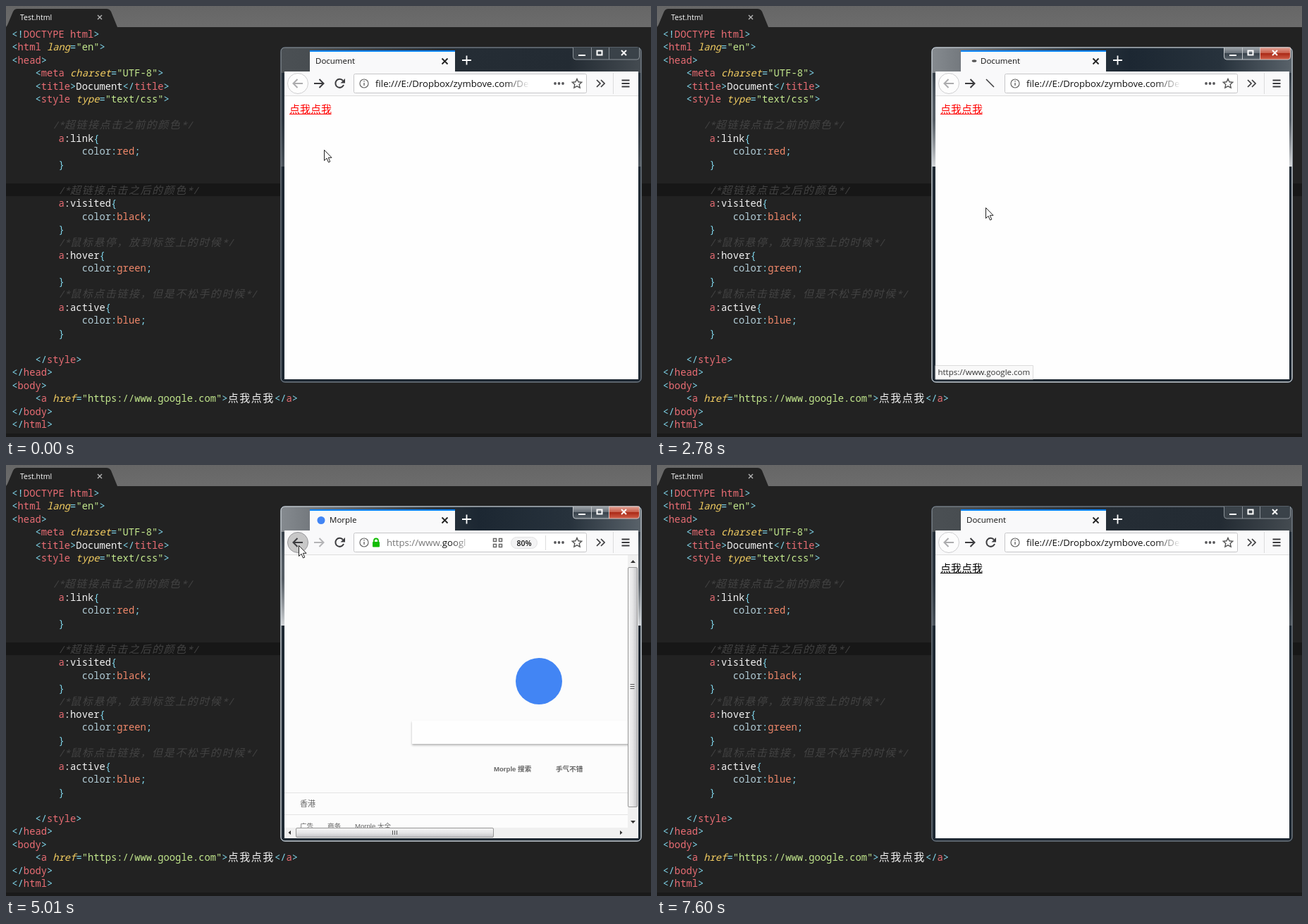
Animation of 915 by 612 pixels, one loop 7700 ms. Source, as an HTML page:

```html
<!DOCTYPE html>
<html lang="zh">
<head>
<meta charset="utf-8">
<title>Link states</title>
<style>
html, body { margin: 0; width: 100%; height: 100%; overflow: hidden; background: #222; }
svg { display: block; width: 915px; height: 612px; }
text { white-space: pre; font-family: "Open Sans", "Noto Sans CJK SC", "Noto Sans CJK", sans-serif; }
#code text { font: 13.8px "Noto Sans Mono", "Noto Sans CJK SC", "Noto Sans CJK", monospace; }
#code .z, #code .k { font-size: 15px; letter-spacing: 1.56px; }
.p { fill: #7fd5ea; } .r { fill: #ea6d74; } .w, .z { fill: #f2f2f2; }
.y { fill: #f6d062; font-style: italic; } .g { fill: #c3e88d; }
.b { fill: #b2ccd6; } .o { fill: #f2896b; }
.c, .k { fill: #434343; font-style: italic; }
.ui { font-size: 11.5px; fill: #111; }
.url { font-size: 13.2px; fill: #111; }
.btn { font: bold 9.6px "Liberation Sans", "Noto Sans CJK SC", "Noto Sans CJK", sans-serif; fill: #666; }
.foot { font: 9.6px "Liberation Sans", "Noto Sans CJK SC", "Noto Sans CJK", sans-serif; fill: #666; }
.ico { fill: none; stroke: #3c3c3f; stroke-width: 2; }
</style>
</head>
<body>
<svg viewBox="0 0 915 612">
  <defs>
    <linearGradient id="bar" x2="0" y2="1"><stop stop-color="#666"/><stop offset="1" stop-color="#6c6c6c"/></linearGradient>
    <linearGradient id="side" x2="0" y2="1"><stop stop-color="#c9cdd1" stop-opacity=".1"/><stop offset=".5" stop-color="#80868c" stop-opacity=".5"/><stop offset="1" stop-color="#d4d7da"/></linearGradient>
    <linearGradient id="glass"><stop stop-color="#858a8f"/><stop offset=".08" stop-color="#74797e"/><stop offset=".42" stop-color="#2a343d"/><stop offset=".55" stop-color="#1c2732"/><stop offset=".8" stop-color="#27323c"/><stop offset="1" stop-color="#59626a"/></linearGradient>
    <linearGradient id="dim"><stop stop-color="#4b5054"/><stop offset=".08" stop-color="#484d51"/><stop offset=".45" stop-color="#252d35"/><stop offset=".8" stop-color="#232b33"/><stop offset="1" stop-color="#444b51"/></linearGradient>
    <linearGradient id="close" x2="0" y2="1"><stop stop-color="#e2a093"/><stop offset=".45" stop-color="#c8604d"/><stop offset=".5" stop-color="#ab2a17"/><stop offset="1" stop-color="#d0604a"/></linearGradient>
    <linearGradient id="cap" x2="0" y2="1"><stop stop-color="#9da3a8"/><stop offset=".45" stop-color="#687078"/><stop offset=".5" stop-color="#39434c"/><stop offset="1" stop-color="#59636b"/></linearGradient>
    <linearGradient id="fade"><stop stop-color="#fff" stop-opacity="0"/><stop offset="1" stop-color="#fff"/></linearGradient>
    <linearGradient id="vthumb"><stop stop-color="#f5f5f5"/><stop offset=".5" stop-color="#e6e6e7"/><stop offset="1" stop-color="#c3c3c6"/></linearGradient>
    <linearGradient id="hthumb" x2="0" y2="1"><stop stop-color="#f5f5f5"/><stop offset=".5" stop-color="#e6e6e7"/><stop offset="1" stop-color="#c3c3c6"/></linearGradient>
    <clipPath id="page"><path d="M395 128H882V515H395Z"/></clipPath>
    <filter id="blur"><feGaussianBlur stdDeviation="1.5"/></filter>
  </defs>

  <rect width="915" height="612" fill="#222"/>
  <rect width="915" height="30" fill="url(#bar)"/>
  <path d="M0 30L2 27L10 8Q12 4 16 4H142Q147 4 149 8L158 30Z" fill="#222"/>
  <text x="20" y="19.5" font-size="10.5" fill="#fff">Test.html</text>
  <path d="M130 13l6 6m0-6l-6 6" stroke="#b5b5b5" stroke-width="1.4"/>
  <rect y="252" width="915" height="18" fill="#171717"/>
  <rect y="607" width="915" height="5" fill="#1a1a1a"/>
  <g id="code"></g>

  <!-- window frame -->
  <rect x="389" y="58" width="513" height="477" rx="6" fill="#1f2933"/>
  <g id="off">
    <path d="M390 95V64Q390 59 395 59H896Q901 59 901 64V95Z" fill="url(#dim)"/>
    <path d="M390 95h5v133h-5zM897 95h4v133h-4z" fill="url(#side)" opacity=".25"/>
    <rect x="390" y="59" width="511" height="475" rx="5.5" fill="none" stroke="#9299a0"/>
    <path d="M804.5 59V72Q804.5 76 808 76H895Q898.5 76 898.5 72V59M830.5 59V76M855.5 59V76" fill="#3a4249" stroke="#8a9197"/>
  </g>
  <g id="on">
    <path d="M390 95V64Q390 59 395 59H896Q901 59 901 64V95Z" fill="url(#glass)"/>
    <path d="M390 95h5v133h-5zM897 95h4v133h-4z" fill="url(#side)"/>
    <rect x="390" y="59" width="511" height="475" rx="5.5" fill="none" stroke="#d9e0e5"/>
    <path d="M804.5 59V72Q804.5 76 808 76H855.5V59M830.5 59V76" fill="url(#cap)" stroke="#c3c8cc"/>
    <path d="M855.5 59V76H895Q898.5 76 898.5 72V59Z" fill="url(#close)" stroke="#d8c5c2"/>
  </g>
  <path d="M812 70h10M838.5 63.5h7v6h-7zM873 63l7 7m0-7l-7 7" fill="none" stroke="#fff" stroke-width="2"/>
  <rect x="431" y="63" width="206" height="31" fill="#f9f9fa"/>
  <rect x="431" y="63" width="206" height="2" fill="#0a84ff"/>
  <path d="M618.5 74.5l8 8m0-8l-8 8" stroke="#222" stroke-width="1.8"/>
  <path d="M647 77h13M653.5 70.5v13" stroke="#fff" stroke-width="1.8"/>
  <text id="title" class="ui" y="82"></text>
  <ellipse id="dot" cy="78" ry="2"/>
  <circle id="favicon" cx="447" cy="78.5" r="5.5" fill="#4285f4"/>

  <!-- toolbar -->
  <rect x="395" y="93" width="502" height="35" fill="#f9f9fa"/>
  <path d="M395 127.5H897" stroke="#dedede"/>
  <circle id="back" cx="414" cy="110" r="14.5"/>
  <path id="backArrow" class="ico" d="M421 110H408M413.5 104L407.5 110L413.5 116"/>
  <path id="fwdArrow" class="ico" d="M437 110H450M444.5 104L450.5 110L444.5 116"/>
  <g id="reload"><path class="ico" d="M478 106A6 6 0 1 0 479 112"/><path d="M481 103v6.5h-6.5z" fill="#3c3c3f"/></g>
  <path id="slash" class="ico" d="M467 104L478 115" style="stroke-width:1.5"/>
  <path id="stop" class="ico" d="M467.5 104.5l11 11m0-11l-11 11"/>
  <rect x="493.5" y="96.5" width="330" height="27" rx="2" fill="#fff" stroke="#c6c6c8"/>
  <circle cx="508" cy="110" r="6" fill="none" stroke="#666" stroke-width="1.2"/>
  <path d="M508 109v4M508 106v1.6" stroke="#666" stroke-width="1.4"/>
  <g fill="#58585b"><circle cx="779" cy="110" r="1.9"/><circle cx="784.5" cy="110" r="1.9"/><circle cx="790" cy="110" r="1.9"/></g>
  <path d="M810 103.5l2 4.3 4.7.5-3.5 3.2 1 4.7-4.2-2.4-4.2 2.4 1-4.7-3.5-3.2 4.7-.5z" fill="none" stroke="#555" stroke-width="1.4"/>
  <path class="ico" d="M838 105l5 5-5 5M844 105l5 5-5 5" style="stroke-width:1.7"/>
  <path d="M861.5 95V125" stroke="#dcdcdd"/>
  <path class="ico" d="M873.5 105.5h11M873.5 110h11M873.5 114.5h11" style="stroke-width:1.8"/>

  <!-- local page -->
  <g id="local">
    <text class="url" x="524" y="115">file:///E:/Dropbox/zymbove.com/De</text>
    <rect x="708" y="100" width="35" height="20" fill="url(#fade)"/>
    <rect x="395" y="128" width="502" height="402" fill="#fefefe"/>
    <g id="link"><text x="402" y="152" font-size="15">点我点我</text><path d="M402 153.5h59.5" stroke="currentColor"/></g>
  </g>

  <!-- remote page -->
  <g id="remote">
    <rect x="520" y="109" width="10" height="7.5" rx="1" fill="#12bc00"/>
    <path d="M522 110v-2.5a3 3 0 0 1 6 0V110" fill="none" stroke="#12bc00" stroke-width="1.8"/>
    <text class="url" x="540" y="115"><tspan fill="#777">https://www.</tspan>googl</text>
    <rect x="630" y="100" width="30" height="20" fill="url(#fade)"/>
    <path d="M691.5 104.5h4v4h-4zM699.5 104.5h4v4h-4zM691.5 112.5h4v4h-4zM699.5 112.5h4v4h-4z" fill="none" stroke="#666" stroke-width="1.5"/>
    <rect x="716.5" y="102.5" width="37" height="16" rx="8" fill="#f3f3f4" stroke="#e2e2e3"/>
    <text x="735" y="114.5" font-size="10.5" font-weight="600" fill="#111" text-anchor="middle">80%</text>
    <path d="M765.5 100V121" stroke="#ddd"/>
    <rect x="395" y="128" width="502" height="402" fill="#fcfcfc"/>
    <g clip-path="url(#page)">
      <circle cx="756" cy="307" r="33" fill="#4285f4"/>
      <rect id="shadow" x="576" y="365" width="330" height="33" fill="#b4b4b4" filter="url(#blur)"/>
      <rect x="576" y="363" width="330" height="33" fill="#fefefe"/>
      <path id="outline" d="M576.5 363V396.5H882" fill="none" stroke="#e4e4e4"/>
      <path id="caret" d="M588.5 372.5V386" stroke="#111" stroke-width="1.4"/>
      <text class="btn" x="692" y="435">Morple 搜索</text>
      <text class="btn" x="780" y="435">手气不错</text>
      <path d="M395 465.5H882M395 496.5H882" stroke="#e4e4e4"/>
      <text class="foot" x="417" y="485" style="font-size:11px">香港</text>
      <text class="foot" x="417" y="515.5">广告</text>
      <text class="foot" x="456" y="515.5">商务</text>
      <text class="foot" x="495" y="515.5">Morple 大全</text>
    </g>
    <path d="M882 128H897V530H395V515H882Z" fill="#f0f0f0"/>
    <rect x="882.5" y="145.5" width="13" height="340" rx="1.5" fill="url(#vthumb)" stroke="#979797"/>
    <rect x="411.5" y="515.5" width="280" height="13" rx="1.5" fill="url(#hthumb)" stroke="#979797"/>
    <path d="M885.5 311.5h6m-6 3h6m-6 3h6M548.5 519v6m3-6v6m3-6v6" stroke="#555"/>
    <path d="M886 139l3.5-4 3.5 4zM886 505l3.5 4 3.5-4zM404 519v6l-3.5-3zM871 519v6l3.5-3z" fill="#333"/>
  </g>

  <g id="status">
    <path id="bubble" fill="#f9f9f9" stroke="#dcdcdc"/>
    <text id="statusText" class="ui" x="398.5" y="524" style="fill:#333"></text>
  </g>
  <path id="arrow" d="M.5 .5V15.5L4 12.2 6.5 18 8.8 17 6.3 11.3H11Z" fill="#fff" stroke="#222"/>
  <path id="hand" d="M4.5 11.5V1.8Q5.8 0 7.2 1.8V7Q9 5.8 10 7.3 11.8 6.5 12.6 8 14.8 7.5 15 9.5V13.5L13.3 17V20H6.3V17.5L1 11.6Q1 9.3 3 10.3Z" fill="#fff" stroke="#222"/>
</svg>

<script>
const LOOP = 7700;
const COLUMN = 8.28;
const $ = id => document.getElementById(id);
const set = (id, attrs) => { for (const k in attrs) $(id).setAttribute(k, attrs[k]); };
const show = (id, on) => { $(id).style.display = on ? '' : 'none'; };

// Each line: column, then "~"-separated runs whose first letter is the colour class.
const rule = (name, color) => [
  [8, `ra~w:${name}~p{`],
  [12, `bcolor~p:~o${color}~p;`],
  [8, 'p}']
];
const note = (col, text) => [col, `c/*~k${text}~c*/`];
const close = (col, tag) => [col, `p</~r${tag}~p>`];
const lines = [
  [0, 'p<!~rDOCTYPE html~p>'],
  [0, 'p<~rhtml ~ylang~p=~g"en"~p>'],
  [0, 'p<~rhead~p>'],
  [4, 'p<~rmeta ~ycharset~p=~g"UTF-8"~p>'],
  [4, 'p<~rtitle~p>~wDocument~p</~rtitle~p>'],
  [4, 'p<~rstyle ~ytype~p=~g"text/css"~p>'],
  null,
  note(7, '超链接点击之前的颜色'), ...rule('link', 'red'),
  null,
  note(8, '超链接点击之后的颜色'), ...rule('visited', 'black'),
  note(8, '鼠标悬停，放到标签上的时候'), ...rule('hover', 'green'),
  note(8, '鼠标点击链接，但是不松手的时候'), ...rule('active', 'blue'),
  null,
  close(4, 'style'),
  close(0, 'head'),
  [0, 'p<~rbody~p>'],
  [4, 'p<~ra ~yhref~p=~g"https://www.google.com"~p>~z点我点我~p</~ra~p>'],
  close(0, 'body'),
  close(0, 'html')
];

lines.forEach((line, i) => {
  if (!line) return;
  const text = document.createElementNS('http://www.w3.org/2000/svg', 'text');
  text.setAttribute('x', 8.3 + line[0] * COLUMN);
  text.setAttribute('y', 45 + i * 18.47);
  for (const run of line[1].split('~')) {
    const span = document.createElementNS(text.namespaceURI, 'tspan');
    span.setAttribute('class', run[0]);
    span.textContent = run.slice(1);
    text.append(span);
  }
  $('code').append(text);
});

// Progress from 0 to 1 in n visible jumps, the first at a and the last at b.
const steps = (t, a, b, n) =>
  t < a ? 0 : Math.min(1, (Math.floor((t - a) / (b - a) * (n - 1)) + 1) / n);
const ease = p => p * p * (3 - 2 * p);

const moves = [
  [680, 950, 5, 447, 148],
  [2570, 2780, 4, 466, 286],
  [3760, 4120, 6, 415, 114],
  [5220, 5570, 6, 440, -24]
];

function pointer(t) {
  let x = 451, y = 204;
  for (const [a, b, n, toX, toY] of moves) {
    const p = ease(steps(t, a, b, n));
    x += (toX - x) * p;
    y += (toY - y) * p;
  }
  return [Math.round(x), Math.round(y)];
}

function draw(t) {
  const [x, y] = pointer(t);
  const remote = t >= 3260 && t < 5160;
  const loading = t >= 2570 && t < 3640;
  const overLink = !remote && t < 3000 && x > 401 && x < 462 && y > 138 && y < 156;

  $('on').style.opacity = t < 7600 ? steps(t, 1900, 1990, 2) : 0;

  show('local', !remote);
  show('remote', remote);
  const color = t >= 5160 ? '#000' : !overLink ? '#f00' : t >= 1900 && t < 2570 ? '#00f' : '#008000';
  $('link').style.color = $('link').style.fill = color;

  $('title').textContent = remote ? 'Morple' : 'Document';
  set('title', { x: loading || remote ? 459 : 439 });
  show('favicon', remote && !loading);
  show('dot', loading);
  const phase = (t - 3320) / 800 * 2 * Math.PI;
  set('dot', {
    cx: 447.5 - 5.5 * Math.cos(phase),
    rx: 2.3 + 1.2 * Math.abs(Math.sin(phase)),
    ry: 2.3 - .6 * Math.abs(Math.sin(phase)),
    fill: remote ? '#0a84ff' : '#555'
  });

  const slash = t >= 2720 && t < 2840 || t >= 3640 && t < 3720;
  const stop = t >= 2840 && t < 3640;
  show('slash', slash);
  show('stop', stop);
  show('reload', !slash && !stop);

  const hover = remote ? steps(t, 4210, 4360, 3) : 0;
  const pressed = remote && t >= 5010;
  const shade = pressed ? 200 : 253 - 35 * hover;
  set('back', {
    fill: `rgb(${shade},${shade},${shade})`,
    stroke: remote ? '#98989b' : '#cfcfd1'
  });
  $('backArrow').style.stroke = remote ? '#3c3c3f' : '#acacae';
  $('fwdArrow').style.stroke = remote ? '#b4b4b6' : '#3c3c3f';

  show('shadow', t >= 3500);
  show('outline', t < 3500);
  show('caret', t < 4240 || t >= 4770 && t < 5010);

  const waiting = t >= 2900;
  show('status', t >= 1100 && t < 3640);
  $('status').style.opacity = steps(t, 1100, 1160, 2);
  $('statusText').textContent = !waiting ? 'https://www.google.com'
    : remote ? '等待 www.google.com.hk...' : '等待 www.google.com...';
  set('bubble', { d: `M395 510.5H${remote ? 549.5 : 533.5}V530H395Z` });

  show('arrow', !overLink && y > -20);
  show('hand', overLink);
  set('arrow', { transform: `translate(${x} ${y})` });
  set('hand', { transform: `translate(${x - 5} ${y - 1})` });
}

function frame() {
  draw(performance.now() % LOOP);
  requestAnimationFrame(frame);
}
frame();
</script>
</body>
</html>
```
